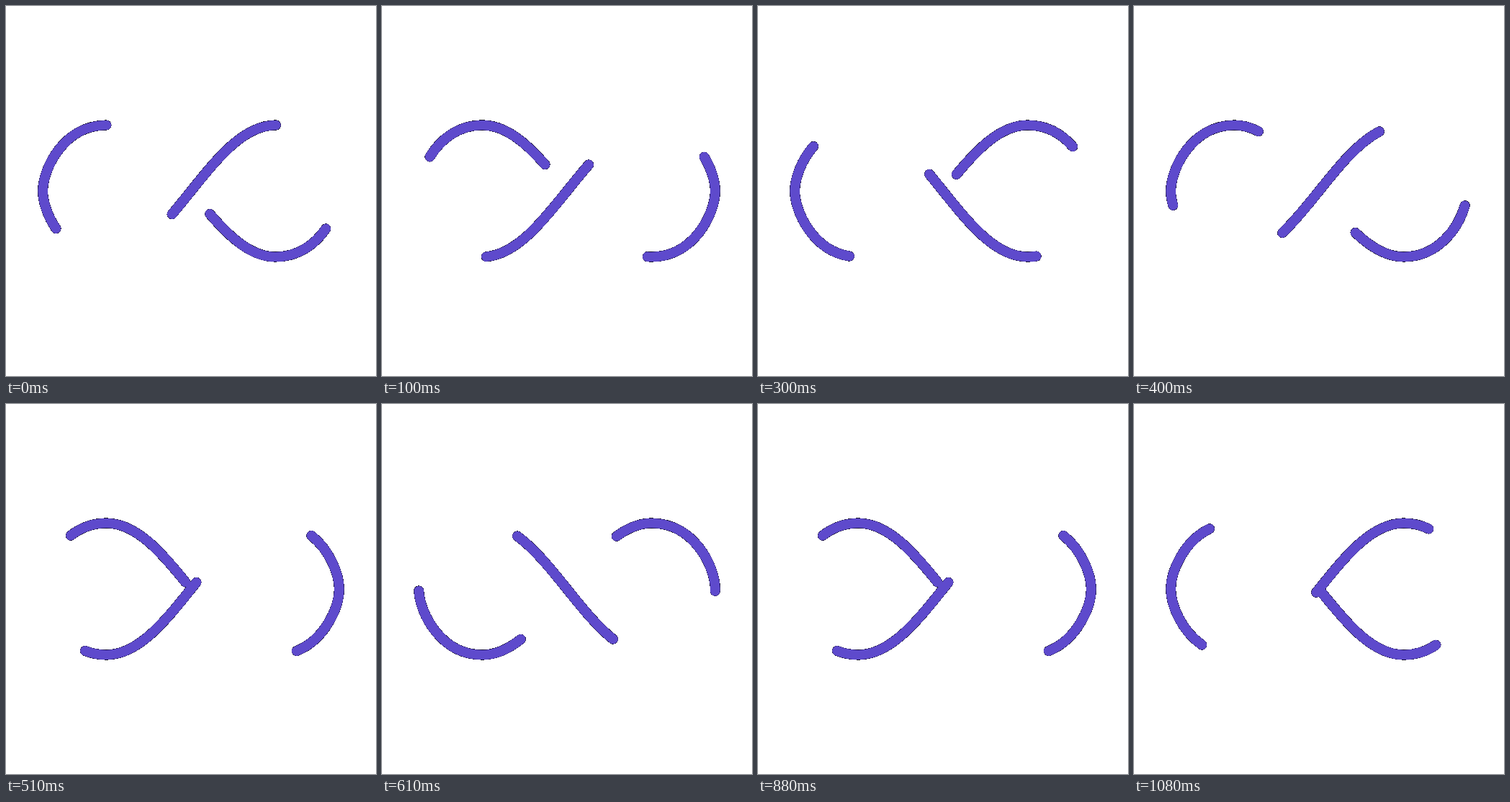
Recreate the animation shown at these times as an HTML page. Size 514 px wide and 514 px high, loop 1110 ms.

```html
<!DOCTYPE html>
<html lang="en">
<head>
<meta charset="utf-8">
<title>Infinity loader</title>
<style>
  html, body { margin: 0; width: 100%; height: 100%; overflow: hidden; background: #fff; }
  svg { display: block; width: 100vw; height: 100vh; }
  use { fill: none; stroke-linecap: round; }
  /* A hard black rim shows through the soft edge of the coloured line. */
  .rim { stroke: #000; stroke-width: 3.12; shape-rendering: crispEdges; }
  .line { stroke: #5e4acc; stroke-width: 3; }
</style>
</head>
<body>
<svg viewBox="0 0 100 100">
  <defs>
    <path id="loop" d="M24.3,30C11.4,30,5,43.3,5,50s6.4,20,19.3,20c19.3,0,32.1-40,51.4-40C88.6,30,95,43.3,95,50s-6.4,20-19.3,20C56.4,70,43.6,30,24.3,30z"/>
  </defs>
  <g id="dashes" transform="translate(50 50) scale(.89) translate(-50 -50)">
    <use href="#loop" class="rim"/>
    <use href="#loop" class="line"/>
  </g>
</svg>
<script>
  const LENGTH = 256.58893;
  const DASH = LENGTH / 6;
  // The dash pattern repeats three times per trip, in 11 steps each.
  const DELAYS = [30, 40, 30, 40, 30, 30, 40, 30, 30, 40, 30];
  const PERIOD = DELAYS.reduce((sum, ms) => sum + ms, 0);
  const STEP = 2 * DASH / DELAYS.length;

  const dashes = document.getElementById('dashes');
  dashes.style.strokeDasharray = `${DASH} ${DASH}`;

  function stepAt(time) {
    let rest = time % PERIOD;
    let step = 0;
    while (step < DELAYS.length - 1 && rest >= DELAYS[step]) rest -= DELAYS[step++];
    return step;
  }

  const start = performance.now();
  function draw(now) {
    dashes.style.strokeDashoffset = stepAt(Math.max(0, now - start)) * STEP;
    requestAnimationFrame(draw);
  }
  draw(start);
</script>
</body>
</html>
```
